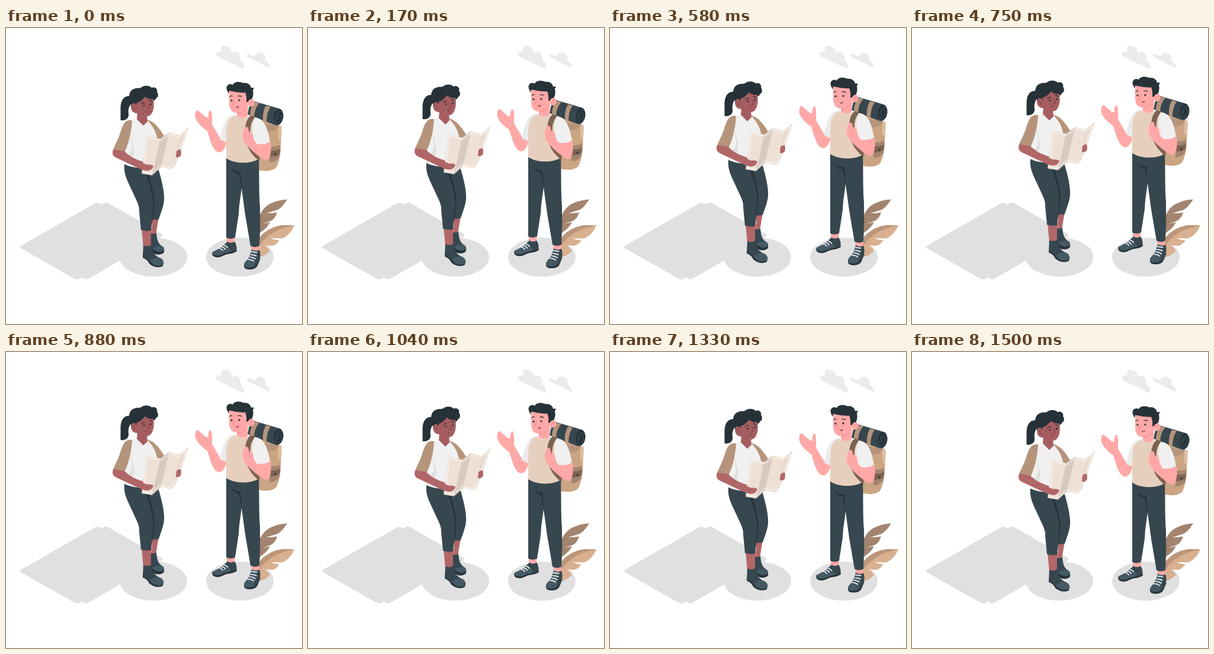
Write an HTML page that moves like this. It is 500x500 px and loops after 1.54 s.

```html
<!DOCTYPE html>
<html lang="en">
<head>
<meta charset="utf-8">
<title>Travellers</title>
<style>
html, body { margin: 0; width: 100%; height: 100%; overflow: hidden; background: #fff; }
svg { display: block; width: 100%; height: 100%; }
.ink { fill: #263238; } .navy { fill: #37474f; } .slate { fill: #455a64; }
.brown { fill: #b6947b; } .tan { fill: #cba583; } .umber { fill: #7c6250; }
.skin { fill: #ffa8a7; } .dark { fill: #b16668; } .face { fill: #a65d60; }
.white { fill: #f0f0f0; } .ground { fill: #e0e0e0; } .cloud { fill: #ebebeb; }
.line { fill: none; stroke: #263238; stroke-linecap: round; stroke-linejoin: round; }
.lace { fill: none; stroke: #fff; stroke-width: 1.6; stroke-linecap: round; }
</style>
</head>
<body>
<svg viewBox="0 0 500 500">
  <g class="cloud">
    <path d="M357 48C354 46 354 40 358 39.500L364 40C361 34 364 29 370 30C377 31 382 37 383 43C385 38 392 40 394 44C396 47 397 51 395 54C400 57 403 63 402 67Q401 70 398 68Z"/>
    <path d="M408 49C405 45 408 42 413 46L421 48C420 43 426 41 431 42C437 44 440 49 438 55C442 57 446 62 446 66Q445 68 442 66Z"/>
  </g>
  <g class="ground">
    <path d="M25 368L149 297Q153 294 157 296L161 298L165 296Q169 294 173 296L262 347Q267 350 262 353L140 423Q135 426 131 423L128 421L124 424Q120 426 115 423L25 372Q23 370 25 368Z"/>
    <ellipse cx="249" cy="387" rx="57" ry="33"/>
    <ellipse cx="395" cy="387" rx="57" ry="33"/>
  </g>

  <path fill="#a3846f" d="M422 345C424 318 434 302 448 296C457 292 467 290 475 289.500C470 297 466 303 459 307L440 313Q450 313 458 311.500C456 318 453 323 447 326L433 331L446 328C442 336 436 341 429 346L424 380Z"/>
  <path fill="#d8b08f" d="M424 388L424 362C431 346 449 335 468 333L487 333.500C483 343 476 352 466 355.500L447 355Q457 359 462 358C458 364 455 367 449 368L437 367Q443 371 446 376C440 383 434 386 427 387Z"/>
  <path fill="#bc967b" d="M424 374L424 361C431 346 449 335 468 333L487 333.500C461 338 442 348 429 366Z"/>

  <g id="people">
    <g id="woman">
      <path class="dark" d="M247 320L258 320L253 349L246 349Z"/>
      <path class="dark" d="M229 338L246 338L245 371L232 371Z"/>
      <path class="ink" d="M245 365L247 378C252 384 261 384 266 380Q268 377 267 374Z"/>
      <path class="navy" d="M245 347Q250 349 254 346C255 358 257 364 263 368Q268 371 267 375C262 380 253 379 247 373Q244 371 245 366Z"/>
      <path class="slate" d="M247 372Q254 367 262 368Q268 371 267 375C262 380 253 379 247 372Z"/>
      <path class="ink" d="M231 382L231 388C237 391 239 392 242 398C248 404 259 406 265 402L266 396Z"/>
      <path class="navy" d="M232 367Q239 371 246 366C246 375 250 383 257 387C264 389 267 394 266 399C259 405 249 402 243 395C240 389 236 390 231 386Z"/>
      <path class="slate" d="M243 393Q252 386 259 388C265 390 267 395 266 399C259 404 249 401 243 393Z"/>
      <path class="navy" d="M200 230L258 240C263 258 268 277 267 291C266 302 261 314 258 323Q252 325 247 323L245 342Q236 344 228 341L225 310C226 303 222 294 218 286C208 262 198 250 200 230Z"/>
      <path class="ink" d="M237 248C242 262 247 277 249 297L246 331L248 324C248 313 252 299 250 285C248 271 244 260 241 249Z"/>
      <path class="brown" d="M238 155C250 157 260 170 268 184L255 190L244 180Z"/>
      <path class="white" d="M211 156L222 153L232 165L238 155C247 164 253 174 255 185L246 230L228 236Q211 236 200 230L203 211L206 186Z"/>
      <path class="ground" d="M212 180C210 192 215 200 212 207L207 215L213 221Q217 211 217 204Q213 193 212 180Z"/>
      <path class="face" d="M222 142L238 146L239 158L232 165L221 154Z"/>
      <path class="brown" d="M213 156C202 153 197 163 193 177C189 190 183 199 181 206L200 211C206 198 212 178 213 156Z"/>
      <path class="dark" d="M181 205C179 212 180 216 186 219L231 240L237 227C222 224 208 217 200 208Z"/>

      <path fill="#eee0d5" d="M237 182L260 187L247 249L229 246Z"/>
      <path fill="#d8cac0" d="M260 187L276 176L262 235L247 249Z"/>
      <path fill="#eee0d5" d="M276 176L293 181L280 239L262 235Z"/>
      <path fill="#eadacd" d="M293 181L309 167L287 230L280 239Z"/>
      <path fill="none" stroke="#fff" d="M257 189L239 185L232 243L246 246L261 232L279 236L285 227L305 173L293 184L277 179L261 190Z"/>
      <path class="dark" d="M288 208Q291 205 295 205Q297 211 295 216Q291 220 287 218Z"/>
      <path class="dark" d="M229 227L238 231Q245 230 249 233C248 238 243 242 236 241L228 239Z"/>

      <path class="ink" d="M212 115C199 113 193 122 193.500 138L193.500 156C203 157 208 152 207 145C206 137 208 130 214 126Z"/>
      <path class="ink" d="M211 130C206 119 207 106 216 103C221 100 226 103 229 100C234 96 243 97 246 101C252 98 257 104 255 108C259 113 256 118 253 119Q252 124 247 122L228 130L219 143C213 141 211 135 211 130Z"/>
      <path class="face" d="M221 126C228 125 231 119 235 116Q240 121 249 120C251 131 249 142 244 147C237 152 227 149 221 144C212 144 209 134 213 128Q218 125 220 131Z"/>
      <path class="line" stroke-width="1.300" d="M229 128Q231 125 234 126M242 123Q245 122 247 125"/>
      <g class="ink"><circle cx="233" cy="131" r="1.500"/><circle cx="244.500" cy="129" r="1.500"/></g>
      <path class="line" style="stroke:#6d373d" stroke-width=".8" d="M240 129L242 136L238 137M234.500 141Q237 143 239 141.500M214 132Q217 133 217 138"/>
    </g>

    <g id="man">
      <path class="tan" d="M424 151L457 162Q465 164 465 173L464 205C463 219 459 232 456 236C448 243 436 242 426 240Z"/>
      <path fill="#dfbd9f" d="M460 165Q466 162 466 171L465 187Q461 191 460 187Z"/>
      <path class="brown" d="M437 161Q449 165 461 162L460 168Q451 177 437 174Z"/>
      <path fill="#a3846f" d="M447 200Q456 201 463 197L462 218Q456 227 445 227Z"/>
      <path class="umber" d="M447 207Q456 208 463 204L462 213Q456 218 446 217Z"/>
      <circle class="ink" cx="455" cy="213" r="1.600"/>
      <path class="navy" d="M413 122L461 136C470 137 470 160 460 164Q457 165 452 163L408 146Z"/>
      <path class="brown" d="M420 125L428 127Q420 135 419 150L412 147Q412 135 420 125ZM439 131L447 133Q440 143 440 159L434 156Q433 142 439 131Z"/>
      <ellipse class="ink" cx="460.500" cy="150" rx="8" ry="13" transform="rotate(8 460.500 150)"/>
      <path fill="none" stroke="#455a64" d="M466 142C458 137 452 157 458 160C465 161 468 145 462 145C457 146 457 156 461 154"/>

      <path class="skin" d="M373 352L387 352L385 367L373 367ZM414 365L428 365L428 378L415 378Z"/>
      <path class="ink" d="M349 378C347 382 349 386 354 387C362 389 366 384 374 382Q385 381 390 377L389 371Z"/>
      <path class="slate" d="M374 361Q380 365 386 361C389 365 390 370 389 375C380 379 371 379 364 383C356 386 350 384 349 380C350 376 360 374 365 369Z"/>
      <path class="navy" d="M374 361Q380 365 386 361C389 365 390 370 389 375L380 378Q378 370 371 366Z"/>
      <path class="lace" d="M368 367Q373 368 374 371M364 370Q369 370 370 374M360 372Q365 373 366 376"/>
      <path class="ink" d="M403 397Q400 404 405 407C413 409 422 408 425 401L430 389Z"/>
      <path class="slate" d="M415 374Q421 378 428 375C431 383 429 392 425 398C421 405 411 406 404 404C400 400 403 396 407 392C412 387 413 381 415 374Z"/>
      <path class="navy" d="M424 377L428 375C431 383 429 392 425 398Q422 402 418 403Q424 390 424 377Z"/>
      <path class="lace" d="M415 378Q420 379 424 379M414 383Q419 383 423 385M412 387Q417 387 421 390M409 391Q415 391 418 394"/>
      <path class="navy" d="M372 218L427 218C428 250 427 280 429 302Q430 335 428 368Q421 372 413 368L404 315L398 271L394 300L393 315L387 354Q379 358 372 354Z"/>
      <path class="ink" d="M379 236C384 241 390 242 396 243L398 271L393 246Q384 244 379 236Z"/>

      <path class="skin" d="M373 188C372 199 369 207 362 210C354 211 350 203 346 193L340 174C331 168 323 160 320 152C319 145 320 139 324 139L338 151L342 151C341 146 343 139 346 139C349 146 348 156 348 163L361 185Z"/>
      <path class="cloud" d="M391 147C375 145 369 158 365 173L361 188L373 194L384 163Z"/>
      <path fill="#e6d0bd" d="M387 148Q400 155 409 149L421 151L427 200L427 221C414 230 386 230 372 220L372 174C373 160 377 151 387 148Z"/>
      <path class="umber" d="M413 148L422 150C414 158 412 166 413 180L422 202L429 214L428 225C416 215 405 202 404 180C403 166 406 154 413 148Z"/>
      <path class="white" d="M420 151C434 152 441 164 446 192Q435 199 422 196C415 182 414 164 420 151Z"/>
      <path class="skin" d="M447 192C449 208 447 221 439 224C428 219 409 202 403 193C398 185 399 172 405 167Q410 166 410 174L417 179Q418 191 424 196Q437 198 447 192Z"/>
      <path fill="none" stroke="#f18f91" stroke-width=".8" d="M410 174Q412 181 408 185"/>

      <path class="skin" d="M390 136L409 130L408 149Q399 155 390 149Z"/>
      <path fill="#f18f91" d="M391 142Q401 140 406 134Q405 142 391 145Z"/>
      <path class="skin" d="M377 106L408 104L409 125C408 137 400 143 391 143C380 144 376 134 377 122Z"/>
      <path class="ink" d="M376 111C373 105 371 101 374 97Q378 93 383 96C386 90 395 90 401 93Q409 92 413 98L414 101L419 101L417 105C419 113 416 120 413 124L406 125Q407 115 404 109C395 110 384 107 377 106Z"/>
      <ellipse class="skin" cx="414" cy="126.500" rx="5.500" ry="6.500" transform="rotate(18 414 126.500)"/>
      <path class="line" stroke-width="1.300" d="M378 116Q380 114 382 115M392 115Q395 114 398 116"/>
      <g class="ink"><circle cx="381" cy="122.500" r="1.600"/><circle cx="394" cy="122" r="1.600"/></g>
      <path class="line" style="stroke:#e07f82" stroke-width=".8" d="M386 122L383 130L386 131M411 127Q414 123 417 124"/>
      <path fill="#a94750" d="M387.500 133Q391 133.500 393 131.500Q394 135 391 135Q389 135 387.500 133Z"/>
    </g>
  </g>
</svg>
<script>
const LOOP = 1540, STEPS = 37, RISE = 9.5, START = 0.5;
const people = document.getElementById("people");

function draw(now) {
  const step = Math.floor(now % LOOP / LOOP * STEPS + 0.1) % STEPS;
  const lift = RISE * (1 - Math.abs(step - 17.5) / 18.5);
  people.setAttribute("transform", `translate(0 ${START - lift})`);
  requestAnimationFrame(draw);
}
draw(performance.now());
</script>
</body>
</html>
```
